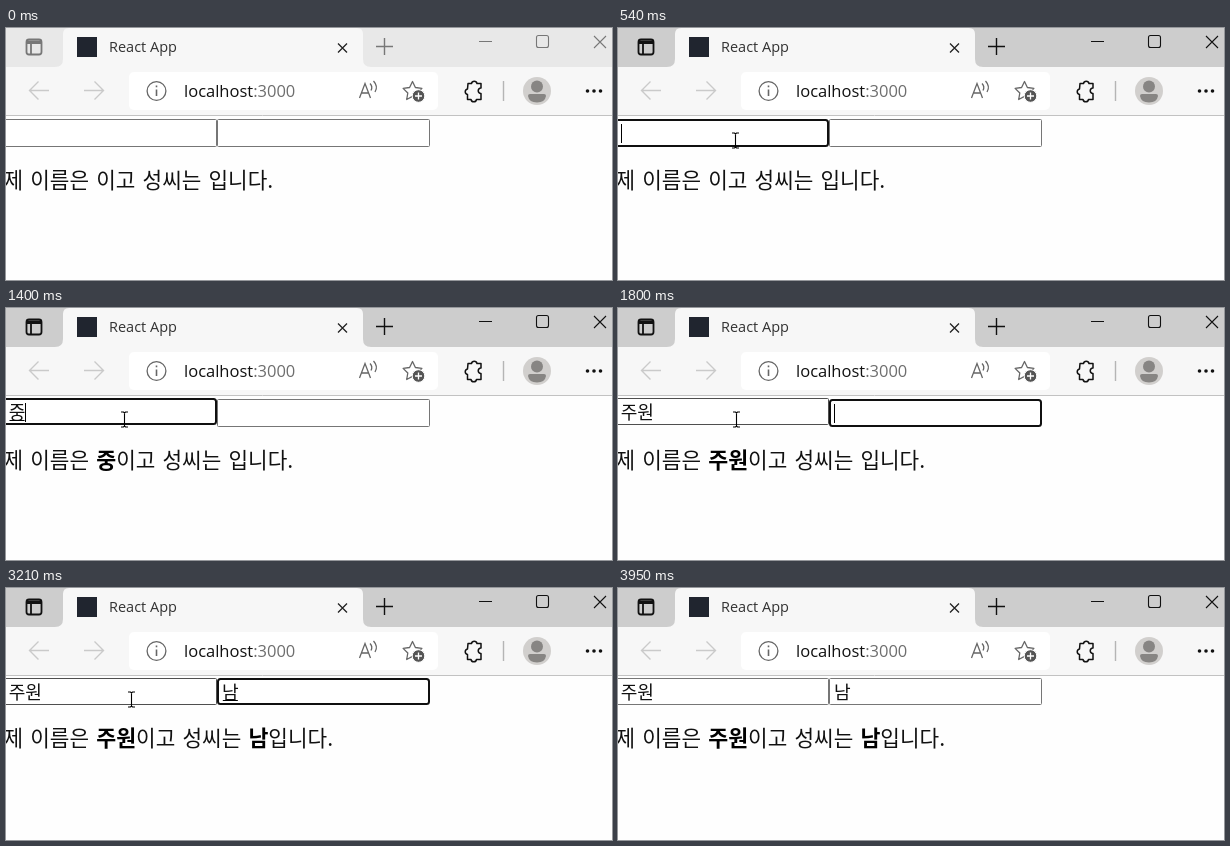
Animation, 606 px wide and 252 px high, one loop 4020 ms. Source, as an HTML page:

```html
<!DOCTYPE html>
<html lang="ko">
<head>
<meta charset="utf-8">
<title>React App</title>
<style>
  html, body { margin: 0; width: 100%; height: 100%; overflow: hidden; background: #fefefe; }
  svg { display: block; width: 606px; height: 252px; fill: none; }
  text { white-space: pre; }
  .ui { font-family: "Open Sans", "Noto Sans", sans-serif; }
  .ko { font-family: "Noto Sans CJK KR", "Noto Sans CJK", sans-serif; font-weight: 300; fill: #111; }
  .field { font-size: 18.1px; }
  #line { font-size: 21.3px; word-spacing: 1.2px; }
  #line tspan { font-size: 21.7px; font-weight: 700; fill: #000; }
</style>
</head>
<body>
<svg viewBox="0 0 606 252">
  <rect id="strip" width="606" height="39"/>
  <path d="M49 39q8 0 8-8V6q0-6 6-6H351q6 0 6 6V31q0 8 8 8z" fill="#f7f7f7"/>
  <rect y="39" width="606" height="48" fill="#f7f7f7"/>
  <path d="M0 87.5H606" stroke="#c2c2c2"/>

  <!-- title bar -->
  <g id="frame" stroke-width="1.1">
    <g stroke-width="1.8">
      <rect x="20.5" y="11.5" width="15" height="15" rx="2.5"/>
      <path d="M21 13.5H35M21 15H35M25 16V26"/>
    </g>
    <path d="M370 18.5H387M378.5 10V27" stroke-width="1.4"/>
    <path d="M473 13.5H486M588 8L600 20M600 8L588 20"/>
    <rect x="530.5" y="7.5" width="12" height="12" rx="2"/>
  </g>
  <rect x="71" y="9" width="20" height="20" fill="#20252f"/>
  <text class="ui" x="103" y="24" font-size="14.5" fill="#333">React App</text>
  <path d="M332 15.5L341 24.5M341 15.5L332 24.5" stroke="#222" stroke-width="1.3"/>

  <!-- toolbar -->
  <path d="M43 62.5H24M32.5 53.5L23.5 62.5L32.5 71.5M78 62.5H97M88.5 53.5L97.5 62.5L88.5 71.5" stroke="#cacaca" stroke-width="1.4"/>
  <rect x="123" y="44" width="309" height="38" rx="5" fill="#fff"/>
  <g stroke="#666" stroke-width="1.3">
    <circle cx="150.5" cy="63" r="9.4"/>
    <path d="M150.5 61.5V68M150.5 57.5V59.3" stroke-width="1.6"/>
    <path d="M353.5 70L359 55.5L364.5 70M355.5 65H362.5M364 55.5q3 3 1 7M367.5 53q5 5.5 1.5 11"/>
    <path d="M406.5 53.5l2.9 6 6.5 .9-4.7 4.6 1.1 6.5-5.8-3.1-5.8 3.1 1.1-6.5-4.7-4.6 6.5-.9z" stroke-linejoin="round"/>
  </g>
  <circle cx="412.5" cy="68" r="6.3" fill="#555" stroke="#fff"/>
  <path d="M409 68H416M412.5 64.5V71.5" stroke="#fff" stroke-width="1.3"/>
  <text class="ui" x="178" y="69" font-size="16.5" fill="#111">localhost<tspan fill="#6e6e6e">:3000</tspan></text>
  <path d="M462 55.5h3.5a2.8 2.8 0 0 1 5.5 0h4v4.5a2 2 0 0 1-.5 0 2.8 2.8 0 0 0 0 5.5h.5v6h-4.5a2.8 2.8 0 0 1-5.5 0h-3.5v-5a2.8 2.8 0 0 1 0-5.5z" stroke="#111" stroke-width="1.5" stroke-linejoin="round"/>
  <path d="M497.5 53V73" stroke="#b5b5b5" stroke-width="1.4"/>
  <circle cx="531" cy="63" r="14" fill="#d1cfcd"/>
  <circle cx="531" cy="58.5" r="6" fill="#878583"/>
  <path d="M522 68q0-2 2-2h14q2 0 2 2q-1 6.5-9 6.5t-9-6.5z" fill="#878583"/>
  <g fill="#111"><circle cx="581.5" cy="63" r="1.8"/><circle cx="588" cy="63" r="1.8"/><circle cx="594.5" cy="63" r="1.8"/></g>

  <!-- page -->
  <g id="fields"></g>
  <text id="line" class="ko" x="-2.5">제 이름은 <tspan id="given"></tspan>이고 성씨는 <tspan id="family"></tspan>입니다.</text>
  <path id="ibeam" d="M-3.5-7.5h2.5l1 1 1-1h2.5M0-6.5V6.5M-3.5 7.5h2.5l1-1 1 1h2.5" stroke="#000" stroke-width="1.1"/>
  <path id="arrow" d="M0 0V16l3.7-3.5 2.6 6 2.5-1.1-2.6-5.8H11.5z" fill="#fff" stroke="#000"/>
</svg>
<script>
const LOOP = 4020;
const ADVANCE = 18.1 * 0.92;
const $ = id => document.getElementById(id);

// each row: start time, then the value held until the next row
const given = [[0, ''], [920, 'ㅈ'], [1250, '주'], [1400, '중'], [1500, '주워'], [1600, '주원']];
const family = [[0, ''], [2200, 'ㄴ'], [2300, '나'], [2400, '남']];
const focus = [[0, -1], [460, 0], [1800, 1], [3950, -1]];
const caretOn = [[0, true], [2930, false], [3460, true]];
const mouse = [
  [0, 0, 300], [70, 196, 238], [150, 178, 205], [230, 158, 170], [310, 136, 136],
  [390, 121, 117], [460, 117, 113], [610, 118, 113], [690, 118, 112],
  [3210, 125, 112], [3280, 130, 128], [3350, 136, 166], [3430, 142, 211], [3500, 0, 300]
];
const at = (rows, t) => rows.findLast(r => r[0] <= t);

$('fields').innerHTML = [0, 1].map(i => `
  <rect id="box${i}" fill="#fff"/>
  <text id="value${i}" class="ko field" x="${[2.7, 216][i]}"></text>
  <path id="under${i}" stroke="#000"/><path id="caret${i}" stroke="#000"/>`).join('');

function set(id, attrs) {
  for (const k in attrs) $(id).setAttribute(k, attrs[k]);
}

function drawField(i, value, t, focused, hover) {
  const y = value ? 90 : 91, left = [2.7, 216][i];
  const end = left + value.length * ADVANCE;
  const composing = focused && value;
  const lastStart = end - ADVANCE;
  // the stroke lies inside the outer edge, so both widths stay crisp
  const stroke = focused ? 2 : 1;
  set('box' + i, {
    x: [-3, 211][i] + stroke / 2, y: y + stroke / 2,
    width: [214, 213][i] - stroke, height: (value ? 27 : 28) - stroke,
    rx: focused ? 2.5 : 1,
    stroke: focused ? '#101010' : hover ? '#4f4f4f' : '#767676',
    'stroke-width': stroke
  });
  $('value' + i).textContent = value;
  set('value' + i, { y: y + 20.5 });
  set('under' + i, { d: composing ? `M${lastStart + 0.8} ${y + 22.5}H${end - 0.8}` : '' });
  const caretX = Math.round(end) + 0.5;
  set('caret' + i, { d: focused && at(caretOn, t)[1] ? `M${caretX} ${y + 5}v19` : '' });
}

function draw(t) {
  const values = [at(given, t)[1], at(family, t)[1]];
  const focused = at(focus, t)[1];
  const [, mx, my] = at(mouse, t);
  const active = t >= 460;

  set('strip', { fill: active ? '#cdcdcd' : '#e8e8e8' });
  set('frame', { stroke: active ? '#111' : '#777' });

  values.forEach((v, i) => drawField(i, v, t, i === focused, i === 0 && my < 119));
  // the focused field is painted last so its ring stays whole
  const top = focused === 0 ? 0 : 1;
  $('fields').append(...['box', 'value', 'under', 'caret'].map(name => $(name + top)));

  $('given').textContent = values[0];
  $('family').textContent = values[1];
  set('line', { y: values[0] && values[1] ? 158 : 160 });

  const overText = my < 119 || (my > 138 && my < 168);
  const place = `translate(${mx + 0.5} ${my - 0.5})`;
  set('ibeam', { transform: place, visibility: overText ? 'visible' : 'hidden' });
  set('arrow', { transform: place, visibility: overText ? 'hidden' : 'visible' });
}

function tick() {
  draw(performance.now() % LOOP);
  requestAnimationFrame(tick);
}
tick();
</script>
</body>
</html>
```
